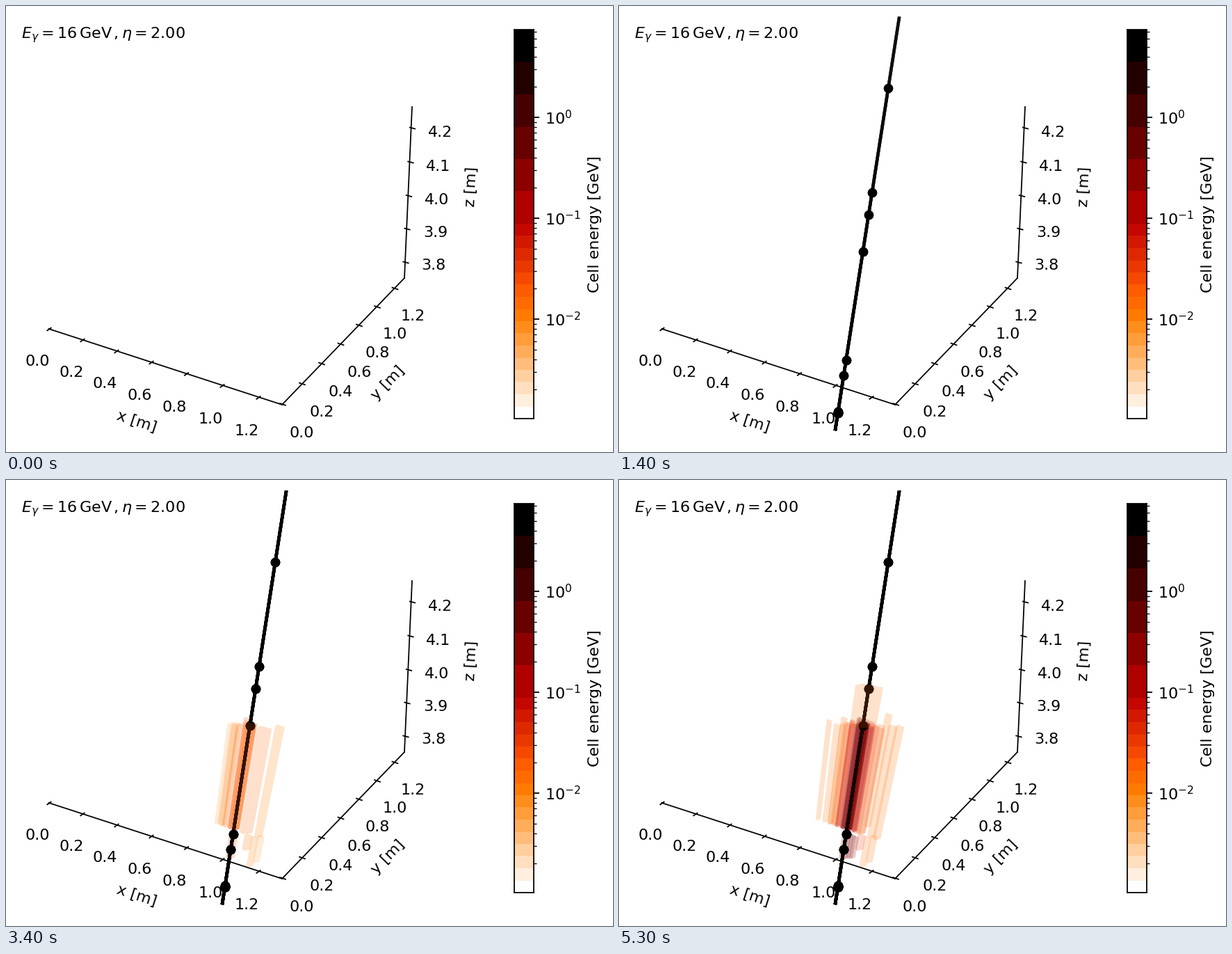
Write a matplotlib script that moves like this. It is 873 by 641 pixels and loops after 6300 ms.

```python
import numpy as np
import matplotlib.pyplot as plt
from matplotlib.animation import FuncAnimation
from matplotlib.collections import PolyCollection

W, H, DPI = 873, 641, 160
FRAMES, STEP = 63, 100
LAST_GROWTH = 53
NEVER = 999

plt.rcParams["font.family"] = "DejaVu Sans"
fig = plt.figure(figsize=(W / DPI, H / DPI), dpi=DPI, facecolor="white")
ax = fig.add_axes([0, 0, 1, 1])
heat = plt.get_cmap("gist_heat")


# ---- static scene, in pixels from the top left ----
def label(x, y, text, angle=0):
    ax.text(x, y, text, rotation=angle, rotation_mode="anchor",
            ha="center", va="center", fontsize=10)


def axis(ends, ticks, half_tick, labels, names):
    """Axis line with slanted ticks and numbers centred on the given points."""
    ax.plot(*zip(*ends), color="black", lw=0.8)
    dx, dy = half_tick
    for x, y in ticks:
        ax.plot([x - dx, x + dx], [y - dy, y + dy], color="black", lw=0.8,
                solid_capstyle="butt")
    for (x, y), name in zip(labels, names):
        ax.text(x, y + 8, f"{name:.1f}", ha="center", va="baseline", fontsize=10)


axis([(61.5, 464), (397, 573)],
     [(62, 464.5), (110, 480.5), (159, 496.5), (209, 512.5),
      (259.5, 529), (311, 546), (363, 563)],
     (3.4, -2.4),
     [(45, 509), (94, 525), (142, 541), (192, 558), (242.5, 575),
      (294, 592), (346, 609)],
     np.arange(7) * 0.2)
axis([(397, 573), (573, 391)],
     [(398, 572.5), (426, 543), (454, 514), (481.5, 486), (508, 459),
      (534, 432.5), (559.5, 406)],
     (4.8, 1.6),
     [(425, 612), (454, 582), (481, 553), (508, 525), (534, 497),
      (559, 470), (585, 444)],
     np.arange(7) * 0.2)
axis([(573, 391), (584, 145)],
     [(575, 368.5), (577, 320.5), (579.5, 273), (582, 224.5), (584.5, 175.5)],
     (4.6, 1.2),
     [(615, 371), (617.5, 324.5), (619.5, 277), (622, 229), (625, 179.5)],
     3.8 + np.arange(5) * 0.1)

label(187.5, 598, "x [m]", -18)
label(549, 542, "y [m]", 46)
label(669, 260, "z [m]", 87.4)
ax.text(853, 314, "Cell energy [GeV]", rotation=90, rotation_mode="anchor",
        ha="center", va="baseline", fontsize=10)
ax.text(21.5, 46.5, r"$E_{\gamma} = 16\,\mathrm{GeV}\,, \eta = 2.00$",
        ha="left", va="baseline", fontsize=10)

# ---- colour bar: six wide bands above sixteen narrow ones ----
TOP, MID, BOTTOM, LEFT, RIGHT = 34, 313, 593, 731, 759
edges = np.round(np.r_[np.linspace(TOP, MID, 7), np.linspace(MID, BOTTOM, 17)[1:]])
bands = np.r_[np.linspace(1, 0.54, 6), np.linspace(0.485, 0, 16)]
ax.pcolormesh([LEFT, RIGHT], edges, bands[:, None], cmap="gist_heat_r", vmin=0, vmax=1)
ax.set(xlim=(0, W), ylim=(H, 0))
ax.axis("off")

scale = fig.add_axes([LEFT / W, 1 - BOTTOM / H, (RIGHT - LEFT) / W, (BOTTOM - TOP) / H])
scale.patch.set_visible(False)
scale.set_yscale("log")
scale.set_ylim(10 ** (-2 - 143 / 145), 10 ** (126 / 145))
scale.set_xticks([])
scale.yaxis.tick_right()


# ---- particle track: every frame lays one more translucent copy on top ----
def track_x(y):
    return 311.2 + 0.1552 * (608 - y)


track_y = np.array([608, 585, 584.6, 584.2, 583.4, 531, 509, 353, 300, 268, 117.5, 17.5])
tracks = []
for k in range(21):
    y = track_y[:k + 2]
    line, = ax.plot(track_x(y), y, "o-", color="black", alpha=0.5, lw=2, ms=5,
                    markevery=slice(1, 11), zorder=5, visible=False)
    tracks.append(line)


# ---- shower cells ----
def cell(x, y, width, length, start, final=0.72, front=NEVER):
    """Long prism whose sides follow the perspective around the track."""
    def foot(px, py, extra=0):
        slope = -0.158 - 0.0009 * (px - track_x(py))
        return px + slope * (length + extra), py + length + extra

    left, notch, right = x - width / 2, x - width / 4, x + width / 2
    y_right = y + 0.08 * width
    shape = [(left, y), (notch, y - 2.5), (right, y_right),
             foot(right, y_right), foot(notch, y, 3), foot(left, y)]
    return dict(shape=shape, start=start, final=final, front=front)


def main_cell(x, width, start, shift=0, **kw):
    u = x - 351
    return cell(x, 350 + 0.09 * u + shift, width, 150 + 0.19 * u - shift, start, **kw)


cells = [
    cell(360, 295, 40, 58, 37, front=45),
    main_cell(302.5, 8, 39),
    main_cell(314, 10, 36, 5),
    main_cell(322.5, 9, 32, 4),
    main_cell(331.5, 2.5, 27, 8),
    main_cell(330, 10, 30, 3, final=0.66),
    main_cell(339, 15, 26, 3, final=0.5),
    main_cell(354, 16, 26, -1, final=0.45),
    main_cell(372, 21, 26, 4, final=0.58),
    main_cell(394, 14, 31, 0),
    main_cell(404, 13, 38, -1),
    cell(388, 337, 11, 160, 38),
    main_cell(351, 19, 31, 0, final=0.25, front=31),
    main_cell(358, 17, 45, 2, final=0.3),
    # cells of the lower layers
    cell(349, 510, 12, 20, 28, 0.6),
    cell(358, 514, 10, 40, 31),
    cell(367, 512, 10, 36, 32),
]
cells += [cell(326 + 3.6 * i, 505 + 2 * i, 9, 37 - 2 * i, 26 + 4 * i, 0.35)
          for i in range(5)]

rng = np.random.default_rng(7)
for i in range(24):
    u = float(np.clip(rng.normal(3, 15), -30, 38))
    core = np.exp(-(u / 15) ** 2)
    cells.append(main_cell(351 + u, rng.uniform(6, 12), 29 + 0.75 * i,
                           rng.uniform(-7, 6),
                           final=0.72 - 0.5 * core * rng.uniform(0.6, 1)))

behind = PolyCollection([], edgecolors="none", zorder=4)
before = PolyCollection([], edgecolors="none", zorder=6)
ax.add_collection(behind, autolim=False)
ax.add_collection(before, autolim=False)


def cell_color(c, n):
    grown = min(1, (n - c["start"]) / (LAST_GROWTH - c["start"]))
    r, g, b, _ = heat(0.75 + (c["final"] - 0.75) * grown)
    return r, g, b, 0.2 * min(1, (n - c["start"] + 1) / 4)


def fill(group, members, n):
    group.set_verts([c["shape"] for c in members])
    group.set_facecolor([cell_color(c, n) for c in members])


def update(frame):
    for k, line in enumerate(tracks):
        line.set_visible(frame > k)
    n = min(frame, LAST_GROWTH)
    alive = [c for c in cells if c["start"] <= n]
    fill(behind, [c for c in alive if c["front"] > n], n)
    fill(before, [c for c in alive if c["front"] <= n], n)
    return [*tracks, behind, before]


anim = FuncAnimation(fig, update, frames=FRAMES, interval=STEP,
                     init_func=lambda: update(0), repeat=True, repeat_delay=0)
plt.show()
```
